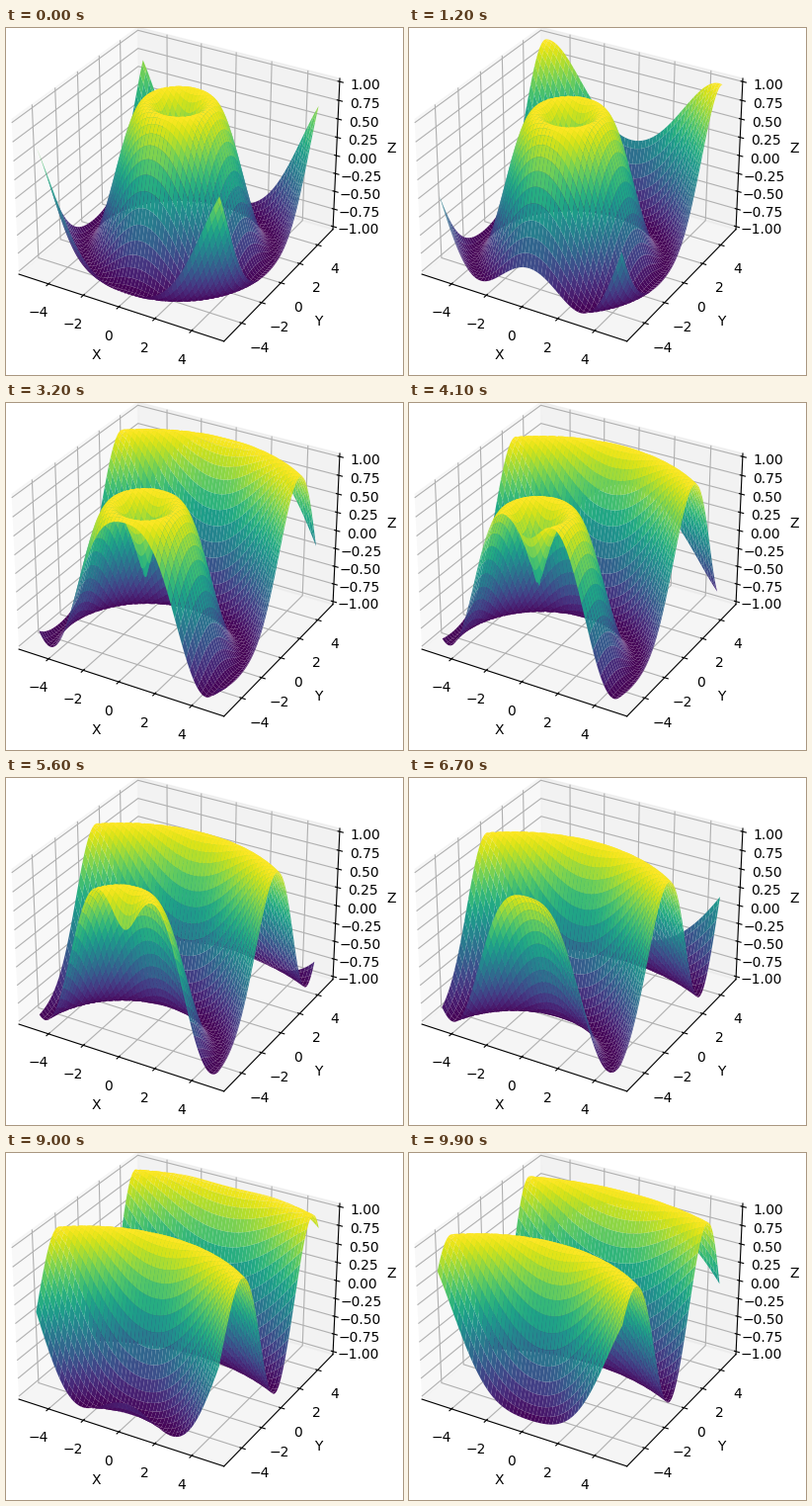
A matplotlib script that plays this animation: 402x351 px, repeating every 10 s.

```python
import numpy as np
import matplotlib.pyplot as plt
from matplotlib.animation import FuncAnimation

W, H, DPI = 402, 351, 100
FRAMES, INTERVAL = 100, 100

# The tiny excess keeps rounding from losing a pixel
fig = plt.figure(figsize=((W + 0.01) / DPI, (H + 0.01) / DPI), dpi=DPI)
# The axes box is larger than the stage, so the plot fills it
ax = fig.add_axes([-78 / W, 10.8 / H, 496 / W, 369.6 / H], projection="3d")

pad = 25 / 24
ax.set(xlim=(-5.5 * pad, 5.5 * pad), ylim=(-5.5 * pad, 5.5 * pad),
       zlim=(-pad, pad), xlabel="X", ylabel="Y", zlabel="Z")

axis = np.linspace(-5, 5, 100)
X, Y = np.meshgrid(axis, axis)


def update(i):
    """Radial sine wave whose centre drifts along -Y."""
    for surface in list(ax.collections):
        surface.remove()
    Z = np.sin(np.hypot(X, Y + 0.1 * i))
    return ax.plot_surface(X, Y, Z, cmap="viridis"),


anim = FuncAnimation(fig, update, frames=FRAMES, interval=INTERVAL,
                     repeat=True, repeat_delay=0, blit=False)
plt.show()
```
